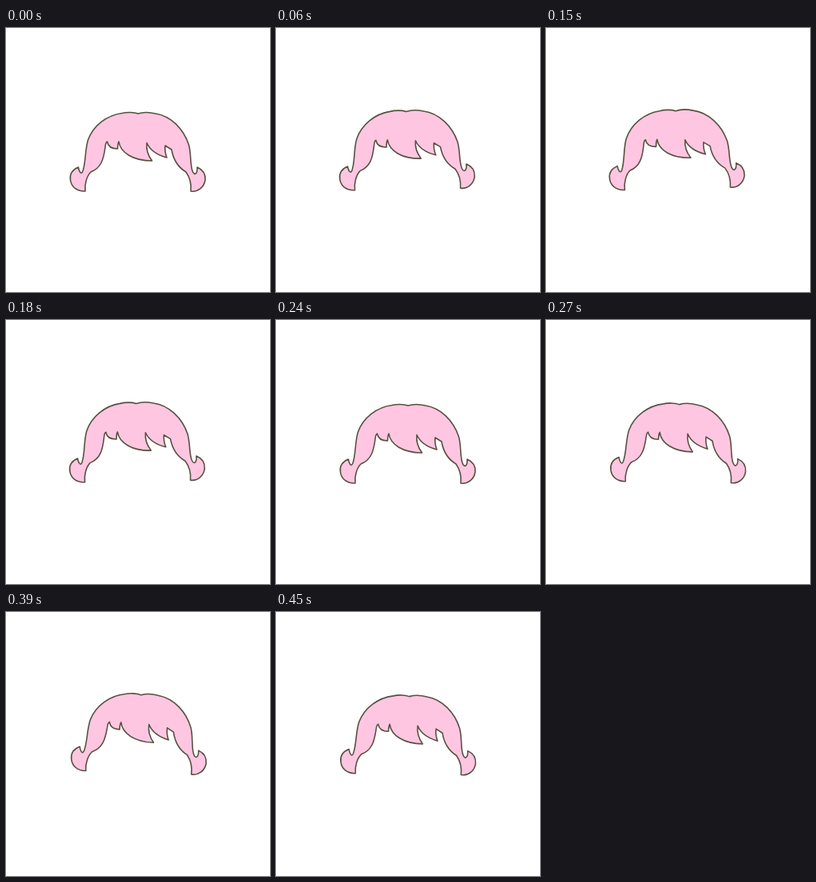
These frames come from a looping animation (330 px wide and 330 px high, 0.48 s). An HTML page:

```html
<!DOCTYPE html>
<html lang="en">
<head>
<meta charset="utf-8">
<title>Bobbing hair</title>
<style>
  html, body { margin: 0; width: 100%; height: 100%; overflow: hidden; background: #fff; }
  svg { display: block; width: 100%; height: 100%; }
</style>
</head>
<body>
<svg viewBox="0 0 330 330">
  <path id="hair" fill="#ffc6e1" stroke="#565142" stroke-width="1.6" stroke-linejoin="round" d="
    M165 107 C160 105 151 105 145 106.500 C126 109 109 122 102.500 140 C98.500 153 100 167 96 179
    Q94.500 183 92.500 180 Q91 178 90.500 174
    C83 177 79.500 183 80.500 190 C81.500 198 88 204.500 99 204
    C98 195 101 185 106 180 C119 175 122 164 124 149 Q124.500 143 126.500 142
    Q128 151 139.500 151 Q139.500 145 141 142
    C143 156 159 166 182.500 166 C178 160 175 152 176 143.500
    C180 153 190 159 201 162 Q198 154 199 147 L207 152
    C209 164 215 174 225 180 C230 187 232 194 231 204
    C240 205.500 247.500 199 249 190 C249.500 183 246 177 239 174
    Q239.500 181 236.500 182.500 Q234 182.500 232.500 177 C230 167 231.500 157 228.500 146
    C222 126 206 110 187 107 C179 105 171 105 165 107 Z"/>
</svg>
<script>
  const hair = document.getElementById("hair");
  const LOOP = 480, STEP = 30;

  function draw(now) {
    const time = Math.floor((now % LOOP) / STEP) * STEP;
    const swing = -Math.sin(time / LOOP * 2 * Math.PI);
    const angle = swing * (swing > 0 ? 2.05 : 1.6);
    const lift = -3.6 * Math.abs(swing);
    hair.setAttribute("transform", `translate(0 ${lift}) rotate(${angle} 165 226)`);
    requestAnimationFrame(draw);
  }

  draw(performance.now());
</script>
</body>
</html>
```
